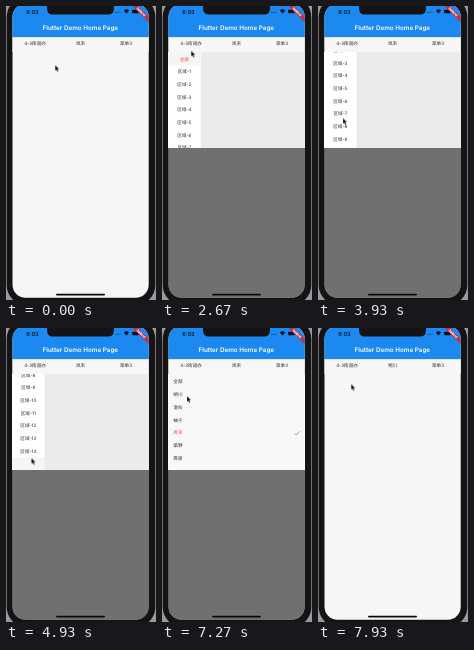
Recreate the animation shown at these times as an HTML page. Size 150x294 px, loop 8000 ms.

```html
<!DOCTYPE html>
<html lang="zh">
<head>
<meta charset="utf-8">
<title>Dropdown menu demo</title>
<style>
html, body { margin: 0; width: 100%; height: 100%; overflow: hidden; background: #9a9a9c; }
.stage, .screen { position: absolute; left: 0; top: 0; width: 150px; height: 294px; overflow: hidden; }
.screen { clip-path: inset(-2px 7.3px 2.2px 6.5px round 13px); background: #f6f6f6; }
svg { position: absolute; left: 0; top: 0; display: block; }
text { font-family: Inter, "Noto Sans CJK SC", "Noto Sans CJK", sans-serif; font-size: 4.6px; fill: #2c2c2c; text-rendering: geometricPrecision; }
.mid { text-anchor: middle; }
.title { font-size: 6.3px; font-weight: 600; fill: #fff; }
.clock { font-size: 5.5px; font-weight: 600; fill: #08131f; }
.debug { font-size: 3.3px; font-weight: 800; fill: #fff; }
.red { fill: #f44336; }

.mask, .panel { position: absolute; left: 0; top: 46px; width: 150px; overflow: hidden; }
.mask { height: 248px; background: rgba(0, 0, 0, .54); }
.panel { height: 0; }

/* One shared 8 s clock: 1% = 80 ms */
.mask, .panel, .list, .first, .second, .before, .after, .cursor { animation: 8s linear infinite; }
.mask { animation-name: dim; }
.panel { animation-name: unfold; }
.list { animation-name: scroll; }
.first { animation-name: leave; }
.second { animation-name: enter; }
.before { animation-name: old; }
.after { animation-name: new; }
.cursor { animation-name: point; }

@keyframes dim {
  0%, 20.875%, 96.625%, 100% { opacity: 0; }
  25%, 92.9% { opacity: 1; }
}
@keyframes unfold {
  0%, 20.875%, 96.625%, 100% { height: 0; }
  25%, 92.9% { height: 96px; }
}
@keyframes leave { 0%, 75% { opacity: 1; } 75.01%, 100% { opacity: 0; } }
@keyframes enter { 0%, 75% { opacity: 0; } 75.01%, 100% { opacity: 1; } }
@keyframes old { 0%, 93.3% { opacity: 1; } 93.31%, 100% { opacity: 0; } }
@keyframes new { 0%, 93.3% { opacity: 0; } 93.31%, 100% { opacity: 1; } }
@keyframes scroll {
  0%, 43.375% { transform: translateY(0); }
  47% { transform: translateY(-21px); }
  49.125% { transform: translateY(-34px); }
  53.4%, 54.125% { transform: translateY(-47px); }
  57.5% { transform: translateY(-83px); }
  60% { transform: translateY(-103px); }
  61.625% { transform: translateY(-107.4px); }
  64.1%, 100% { transform: translateY(-94.7px); }
}
@keyframes point {
  0%, .875% { transform: translate(49.2px, 59.2px); }
  1.625%, 3.375% { transform: translate(44.7px, 48px); }
  13.375%, 32.5% { transform: translate(29.2px, 37.7px); }
  33.375% { transform: translate(29.2px, 44.7px); }
  41.625%, 43.375% { transform: translate(25.5px, 133px); }
  47% { transform: translate(25.5px, 98px); }
  49.125% { transform: translate(25px, 112.2px); }
  53.4%, 54.125% { transform: translate(25.5px, 131px); }
  57.5% { transform: translate(25.5px, 92px); }
  61.625%, 65% { transform: translate(25.5px, 130.2px); }
  68.4%, 70.875% { transform: translate(55px, 60px); }
  75%, 82.5% { transform: translate(73px, 36px); }
  90.875%, 93.4% { transform: translate(25px, 68.2px); }
  96.6%, 98.4% { transform: translate(27.5px, 83px); }
  99.125%, 100% { transform: translate(33.2px, 56.2px); }
}
</style>
</head>
<body>
<div class="stage">
  <svg width="150" height="294">
    <rect x=".7" y="-9" width="148.6" height="308" rx="20" fill="#141415"/>
  </svg>

  <div class="screen">
    <svg width="150" height="294">
      <defs>
        <linearGradient id="shade" x2="0" y2="1">
          <stop stop-color="#000" stop-opacity=".12"/>
          <stop offset="1" stop-color="#000" stop-opacity="0"/>
        </linearGradient>
      </defs>
      <rect y="-2" width="150" height="33" fill="#1b89f0"/>
      <rect y="31" width="150" height="15" fill="#f7f7f8"/>
      <rect y="31" width="150" height="1.5" fill="url(#shade)"/>
      <text class="mid title" x="74.3" y="24.3">Flutter Demo Home Page</text>
      <text class="mid" x="29" y="39.2">4-3街道办</text>
      <text class="mid before" x="74.5" y="39.2">岚禾</text>
      <text class="mid after" x="74.5" y="39.2">朔川</text>
      <text class="mid" x="120" y="39.2">菜单3</text>
    </svg>

    <div class="mask"></div>

    <div class="panel">
      <svg class="first" width="150" height="96">
        <rect width="150" height="96" fill="#ebebeb"/>
        <rect width="38.5" height="96" fill="#f5f5f5"/>
        <g class="list" id="areas">
          <rect y=".7" width="38.5" height="190" fill="#fff"/>
          <rect width="38.5" height="13.4" fill="#f5f5f5"/>
        </g>
      </svg>
      <svg class="second" width="150" height="96">
        <rect width="150" height="96" fill="#f8f8f8"/>
        <g id="makers"></g>
        <path d="M132.6 59.3l1.6 1.6 3.4-3.6" fill="none" stroke="#8c8c8c" stroke-width=".8"/>
      </svg>
    </div>

    <svg width="150" height="294">
      <text class="clock" x="20.2" y="7.6">6:03</text>
      <g fill="#08131f">
        <circle cx="110" cy="6.2" r=".5"/>
        <circle cx="112" cy="6.2" r=".5"/>
        <circle cx="114" cy="6.2" r=".5"/>
        <path d="M117.8 4.4q2.7-2.4 5.4 0l-2.7 3z"/>
        <rect x="126" y="3.8" width="7" height="3.5" rx="1"/>
      </g>
      <path d="M39 -2h71q-2 0-2 2.5v2q0 6-6 6H47q-6 0-6-6v-2q0-2.5-2-2.5z" fill="#141415"/>
      <g transform="translate(143 -2) rotate(45)">
        <rect x="-13.2" y="9.2" width="26.4" height="4" fill="#cb2a38" opacity=".88"/>
        <text class="mid debug" y="12.4">DEBUG</text>
      </g>
      <rect x="50" y="287.8" width="49" height="1.6" rx=".8" fill="#0a0a0a"/>
    </svg>
  </div>

  <svg width="150" height="294">
    <path class="cursor" d="M0 0V5.4l1.2-1.1.9 2.1 1-.4-.9-2.1h1.7z" fill="#111" stroke="#fff" stroke-width=".4" paint-order="stroke"/>
  </svg>
</div>

<script>
const fill = (id, names, x, pitch, picked, cls) => names.forEach((name, i) => {
  const label = document.createElementNS("http://www.w3.org/2000/svg", "text");
  label.textContent = name;
  label.setAttribute("x", x);
  label.setAttribute("y", 8.8 + i * pitch);
  label.setAttribute("class", cls + (i === picked ? " red" : ""));
  document.getElementById(id).append(label);
});

const areas = Array.from({ length: 15 }, (_, i) => i ? `区域-${i}` : "全部");
fill("areas", areas, 22.3, 12.67, 0, "mid");
fill("makers", ["全部", "朔川", "澄屿", "柚宁", "岚禾", "棠野", "霁原"], 11.3, 12.92, 4, "");
</script>
</body>
</html>
```
